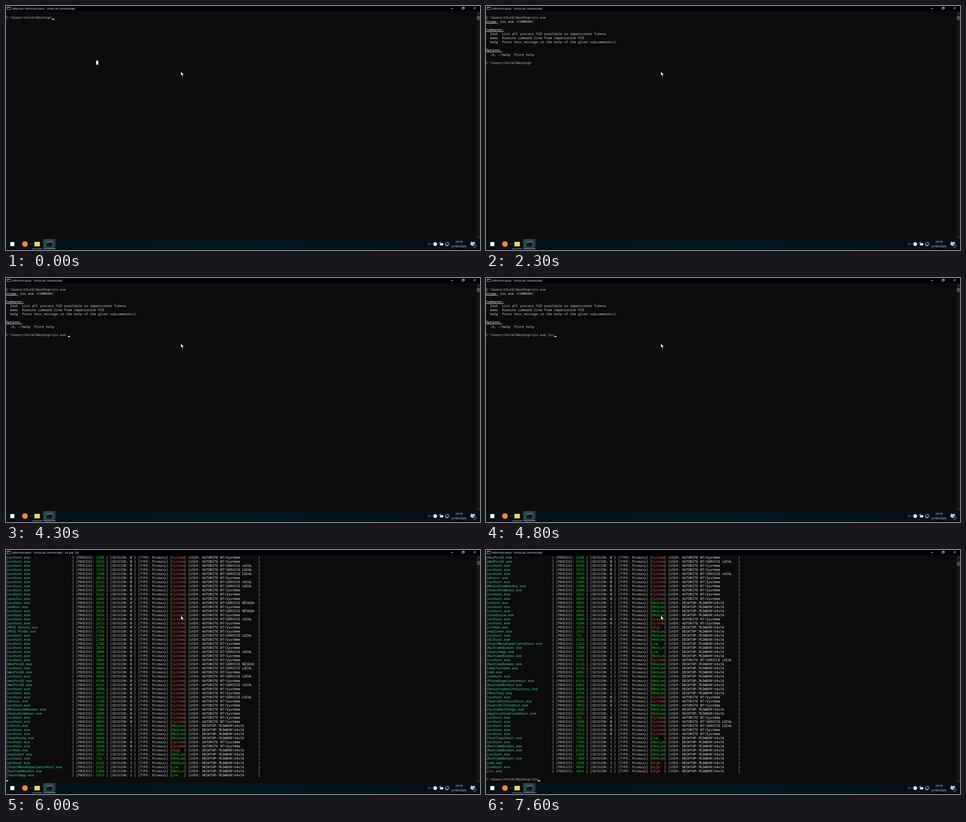
These frames come from a looping animation (1042 by 538 pixels, 8000 ms). An HTML page with a canvas:

```html
<!DOCTYPE html>
<html lang="fr">
<head>
<meta charset="utf-8">
<title>Invite de commandes</title>
<style>
  html, body { margin: 0; width: 100%; height: 100%; overflow: hidden; background: #000; }
  canvas { display: block; }
</style>
</head>
<body>
<canvas id="stage" width="1042" height="538"></canvas>
<script>
const ctx = document.getElementById('stage').getContext('2d');
ctx.textRendering = 'geometricPrecision';

const LOOP = 8000;
const CELL_W = 4.4, CELL_H = 9.05, TOP = 12;
const GREY = '#cccccc', WHITE = '#f2f2f2', TEAL = '#4fd6a6', GREEN = '#16c60c', RED = '#e74856';
const MONO = '7.333px "Noto Sans Mono", monospace';
const UI = 'px "Open Sans", sans-serif';
const PROMPT = String.raw`C:\Users\t4v1k\Desktop>`;
const TITLE = 'Administrateur : Invite de commandes';

// Each process: PID plus a letter naming its account and integrity level.
const DESKTOP_USER = String.raw`DESKTOP-7K2WBXR\t4v1k`;
const SYSTEM_USER = String.raw`AUTORITE NT\Système`;
const ACCOUNTS = {
  s: [0, 'System', SYSTEM_USER],
  l: [0, 'System', String.raw`AUTORITE NT\SERVICE LOCAL`],
  r: [0, 'System', String.raw`AUTORITE NT\SERVICE RÉSEAU`],
  m: [0, 'Medium', SYSTEM_USER],
  d: [1, 'Medium', DESKTOP_USER],
  H: [1, 'High', DESKTOP_USER],
  L: [1, 'Low', DESKTOP_USER],
};
const PROCESSES = `
svchost: 1988s 2028s 2036l 1312l 1608l 2064s 2132l 2136l 2204s 2212s
spoolsv: 2408s
svchost: 2476r
armsvc: 2616s
svchost: 2628r 2636s 2652l 2672s
PRTG Server: 2744s
PRTG Probe: 2756s
svchost: 2764l 2780s 2788s 2828s 3000l 3124s 3804s
WmiPrvSE: 3468r
svchost: 4008l
WmiPrvSE: 4856s
svchost: 4948l
WmiPrvSE: 4180s 4124l
svchost: 4580s 3472s 4556l
uhssvc: 1320s
svchost: 1684s
MoUsoCoreWorker: 1500s
SearchIndexer: 2880s
svchost: 2856s 4068s
sihost: 3056d
svchost: 4684d 4996d
taskhostw: 5048d
svchost: 4908s 4360s
ctfmon: 1316H
explorer: 1692d
svchost: 752d
dllhost: 4256d
StartMenuExperienceHost: 5224L
RuntimeBroker: 5300d
SearchApp: 5452L
RuntimeBroker: 5648d
svchost: 5792l
RuntimeBroker: 6116d
smartscreen: 6136d
cmd: 4004d
conhost: 4592d
PhoneExperienceHost: 6224d
RuntimeBroker: 6384d
SecurityHealthSystray: 6660d
VBoxTray: 6788d
svchost: 6844s
SearchProtocolHost: 7068s
SearchFilterHost: 7092m
SystemSettings: 6432d
ApplicationFrameHost: 6436d
svchost: 392s 1688l 7324l 7352s 7412s
TextInputHost: 7596L
dllhost: 7704d
RuntimeBroker: 6308d 6152d
svchost: 4288d
RuntimeBroker: 7304d
cmd: 7240H
conhost: 4664H
irs: 5044H`.trim().split('\n').flatMap(line => {
  const [name, list] = line.split(': ');
  return list.split(' ').map(item => [name + '.exe', item.slice(0, -1), ...ACCOUNTS[item.slice(-1)]]);
});

// [time, screen, typed text, cursor visible]
const STEPS = [
  [0, 'select', '', true],
  [200, 'start', 'i', true],
  [500, 'start', 'irs', true],
  [600, 'start', 'irs.exe', true],
  [1200, 'start', 'irs.exe', false],
  [1400, 'start', 'irs.exe ', true],
  [1700, 'help', '', true],
  [2300, 'help', '', false],
  [2700, 'help', 'i', true],
  [2900, 'help', 'ir', true],
  [3100, 'help', 'irs', true],
  [3200, 'help', 'irs.exe', true],
  [4300, 'help', 'irs.exe ', true],
  [4600, 'help', 'irs.exe l', true],
  [4800, 'help', 'irs.exe lis', true],
  [5400, 'help', 'irs.exe lis', false],
  [5500, 'help', 'irs.exe list', true],
  [5800, 'help', 'irs.exe list', false],
  [6000, 'listing', '', true],
  [6100, 'done', '', true],
  [6900, 'done', '', false],
  [7300, 'done', 'i', true],
  [7400, 'done', 'ir', true],
  [7500, 'done', 'irs', false],
  [7600, 'done', 'irs', true],
];

function box(x, y, w, h, color) {
  ctx.fillStyle = color;
  ctx.fillRect(x, y, w, h);
}

function disc(x, y, r, color) {
  ctx.fillStyle = color;
  ctx.beginPath();
  ctx.arc(x, y, r, 0, 7);
  ctx.fill();
}

function stroke(path, color = '#fff', width = 0.8) {
  ctx.strokeStyle = color;
  ctx.lineWidth = width;
  ctx.stroke(new Path2D(path));
}

function label(text, x, y, size, align = 'left') {
  ctx.font = size + UI;
  ctx.textAlign = align;
  ctx.fillStyle = '#fff';
  ctx.fillText(text, x, y);
}

// Writes text on the console grid and returns the next free column.
function write(text, col, row, color = GREY) {
  ctx.font = MONO;
  ctx.textAlign = 'left';
  ctx.fillStyle = color;
  for (const char of text) {
    if (char !== ' ') ctx.fillText(char, col * CELL_W, TOP + row * CELL_H + 7);
    col++;
  }
  return col;
}

function writeParts(row, ...parts) {
  let col = 0;
  for (const [text, color] of parts) col = write(text, col, row, color);
}

function heading(text, row) {
  write(text, 0, row, WHITE);
  box(0, Math.round(TOP + row * CELL_H + 8), text.length * CELL_W, 1, GREY);
}

function cursor(col, row) {
  box(Math.round(col * CELL_W), Math.round(TOP + row * CELL_H + 7), 5, 2, WHITE);
}

function prompt(row, typed, blinkOn) {
  const end = write(PROMPT + typed, 0, row);
  if (blinkOn) cursor(end, row);
}

function help() {
  write(PROMPT + 'irs.exe', 0, 1);
  heading('Usage:', 2);
  write('irs.exe', 7, 2, WHITE);
  write('<COMMAND>', 15, 2);
  heading('Commands:', 4);
  [['list', 'List all process PID available to impersonate Tokens'],
   ['exec', 'Execute command line from impersonate PID'],
   ['help', 'Print this message or the help of the given subcommand(s)'],
  ].forEach(([name, about], i) => writeParts(5 + i, ['  ' + name, WHITE], ['  ' + about]));
  heading('Options:', 9);
  writeParts(10, ['  -h, --help', WHITE], ['  Print help']);
}

function listing(first, count) {
  PROCESSES.slice(first, first + count).forEach(([name, pid, session, level, user], row) => {
    const levelColor = /System|High/.test(level) ? RED : GREEN;
    writeParts(row,
      ['['], [name.padEnd(32), TEAL], ['] [PROCESS: '], [pid.padEnd(5), GREEN],
      ['] [SESSION: '], [session + ' ', WHITE], ['] [TYPE: Primary] ['],
      [level.padEnd(6), levelColor], ['] [USER: '], [user.padEnd(28), WHITE], [']']);
  });
}

function windowFrame(title, thumbY) {
  box(0, 0, 1042, 538, '#000');
  box(0, 12, 1042, 502, '#0c0c0c');
  box(2, 2, 8, 7, '#b8b8b8');
  box(2.7, 3.6, 6.6, 4.7, '#000');
  label('C:\\', 3, 7.6, 4);
  label(title, 13, 8, 6.26);
  stroke('M977.5 5.5h5.5');
  stroke('M1002.5 3.8h3.6v3.6h-3.6zM1003.8 3.8v-1.3h3.7v3.7h-1.4');
  stroke('M1028 2.5l5 5m0-5l-5 5');
  box(1035, 12, 7, 502, '#171717');
  box(1035, thumbY, 7, 9, '#4d4d4d');
  stroke('M1037 18l2-2 2 2M1037 508l2 2 2-2', '#999');
}

function taskbar() {
  const shade = ctx.createLinearGradient(0, 0, 1042, 0);
  shade.addColorStop(0, '#02121a');
  shade.addColorStop(0.5, '#011823');
  shade.addColorStop(1, '#02101c');
  box(0, 514, 1042, 22, shade);
  box(82, 514, 24.5, 22, '#33474e');
  box(107, 514, 2, 22, '#263a42');
  box(57, 535, 23, 1, '#76b9ed');
  box(82, 535, 27, 1, '#76b9ed');

  box(9.5, 520.5, 9, 9, '#fff');
  disc(41.7, 525, 6.2, '#ff8a2b');
  box(62.5, 520, 12, 10, '#f6cf62');
  box(89, 520, 12, 9.6, '#050505');
  box(89, 520, 12, 1.2, '#b4b8ba');
  label('C:\\_', 90.3, 525.6, 4);

  stroke('M927.5 526.5l3-3 3 3', '#fff', 0.9);
  disc(943.5, 525, 4, '#f0f0f0');
  box(954.5, 523, 6.5, 5, '#e8e8e8');
  box(961, 524.4, 0.8, 2.2, '#e8e8e8');
  stroke('M953 521.3h3.4v2.6h-3.4zM954.7 524v4', '#e8e8e8');
  stroke('M967 521.8h7v5h-7zM970.5 527v1.8m-2 0h4M966 524v5h2.5', '#e8e8e8');
  label('10:19', 995.7, 522.3, 6.1, 'center');
  label('01/02/2023', 996, 532.2, 6.1, 'center');

  ctx.fillStyle = '#fff';
  ctx.fill(new Path2D('M1021.5 520.5h9v7h-4l-2 2v-2h-3z'));
  stroke('M1023 522.7h6m-6 2h6', '#02121a', 0.6);
  disc(1030.3, 529, 4.2, '#8a9499');
  disc(1030.3, 529, 3.6, '#142229');
  label('1', 1030.3, 531.1, 5.6, 'center');
}

function pointer() {
  const arrow = 'M384.6 145v8.6l2-1.9 1.4 3.2 1.5-.7-1.4-3.1h2.7z';
  ctx.fillStyle = '#fff';
  ctx.fill(new Path2D(arrow));
  stroke(arrow, '#000', 0.4);
}

const SCREENS = {
  select(typed, on) {
    windowFrame('Sélection ' + TITLE, 22);
    prompt(1, typed, on);
    box(198, 120.5, 5, 9, WHITE);
  },
  start(typed, on) {
    windowFrame(TITLE, 22);
    prompt(1, typed, on);
  },
  help(typed, on) {
    windowFrame(TITLE, 22);
    help();
    prompt(12, typed, on);
  },
  listing() {
    windowFrame(TITLE + ' - irs.exe  list', 24);
    listing(0, 54);
    cursor(0, 54);
  },
  done(typed, on) {
    windowFrame(TITLE, 26);
    listing(30, 53);
    prompt(54, typed, on);
  },
};

const startTime = performance.now();
let shown;

function frame() {
  const time = (performance.now() - startTime) % LOOP;
  const step = STEPS.findLast(([at]) => at <= time);
  if (step !== shown) {
    shown = step;
    const [, screen, typed, on] = step;
    SCREENS[screen](typed, on);
    taskbar();
    pointer();
  }
  requestAnimationFrame(frame);
}
frame();
</script>
</body>
</html>
```
